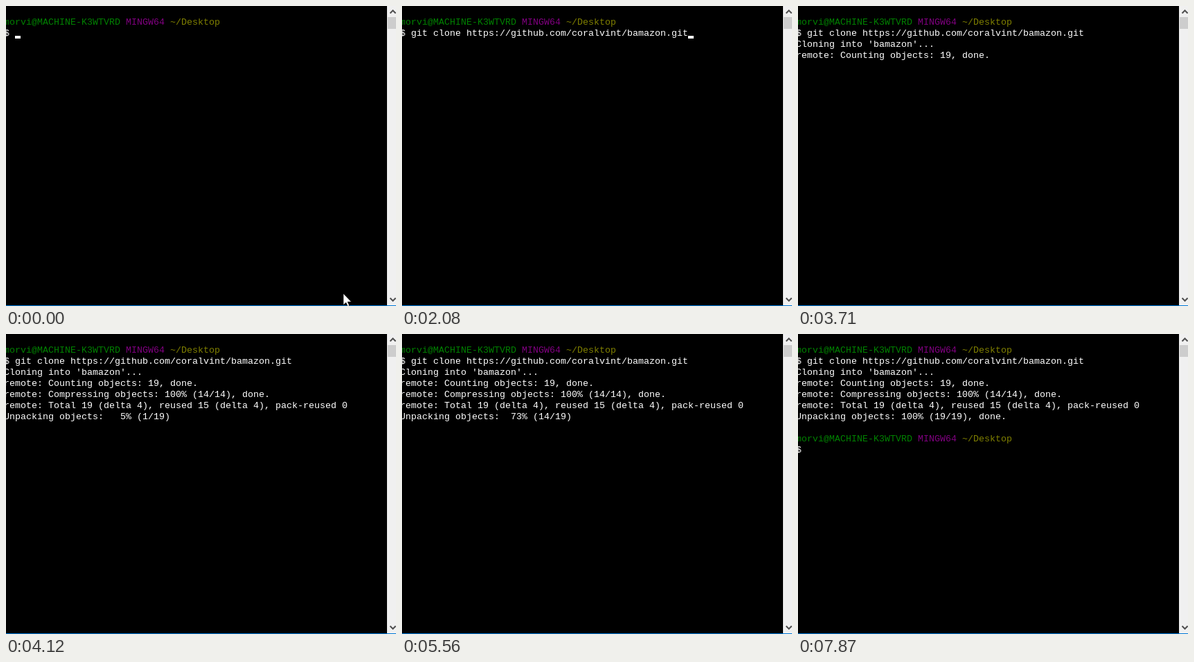
These frames come from a looping animation (563 by 433 pixels, 8 s). An HTML page:

```html
<!DOCTYPE html>
<html lang="en">
<head>
<meta charset="utf-8">
<title>Cloning a repository</title>
<style>
  html, body { margin: 0; width: 100%; height: 100%; overflow: hidden; background: #000; }
  svg { display: block; }
  text { font: 13.333px "Courier New", "Liberation Mono", monospace; white-space: pre; fill: #fff; }
  .user { fill: #008000; }
  .system { fill: #800080; }
  .path { fill: #808000; }
  .arrow { fill: none; stroke: #505050; stroke-width: 2; }
</style>
</head>
<body>
<svg width="563" height="433" viewBox="0 0 563 433">
  <rect width="563" height="433"/>
  <g id="screen"></g>
  <rect id="cursor" width="8" height="4" fill="#fff"/>
  <rect x="550" width="13" height="432" fill="#f0f0f0"/>
  <rect x="551" y="16" width="12" height="17" fill="#cdcdcd"/>
  <path class="arrow" d="M554.5 10.5l4-4 4 4M554.5 421.5l4 4 4-4"/>
  <rect y="432" width="563" height="1" fill="#0078d7"/>
  <path id="mouse" d="M0 0V16.5L3.8 13l2.5 5.5 2.4-1L6.2 12H11.5z" fill="#fff" stroke="#000" stroke-width=".6"/>
</svg>
<script>
const LOOP = 8000, LEFT = -3, COL = 8, ROW = 16, BASE = 27;
const OBJECTS = 19, BLINK = 525, BLINK_START = 495;
const screen = document.getElementById('screen');
const cursor = document.getElementById('cursor');
const mouse = document.getElementById('mouse');

const prompt = '<tspan class="user">morvi@MACHINE-K3WTVRD</tspan> ' +
  '<tspan class="system">MINGW64</tspan> <tspan class="path">~/Desktop</tspan>';
const command = '$ git clone https://github.com/coralvint/bamazon.git';
const remote = [
  'remote: Counting objects: 19, done.',
  'remote: Compressing objects: 100% (14/14), done.',
  'remote: Total 19 (delta 4), reused 15 (delta 4), pack-reused 0'
];

// Each write sets one row; the cursor, if any, stands after its text
const writes = [
  { at: 0, row: 0, text: prompt },
  { at: 0, row: 1, text: '$ ', cursor: 'blink' },
  { at: 170, row: 1, text: command, cursor: 'blink' },
  { at: 2710, row: 2, text: "Cloning into 'bamazon'..." },
  { at: 2710, row: 3, text: '', cursor: 'solid' },
  ...remote.map((text, i) => ({ at: 3640 + 75 * i, row: 3 + i, text })),
  ...Array.from({ length: OBJECTS }, (_, i) => ({ at: 4120 + 110 * i, row: 6, text: progress(i + 1) })),
  { at: 6420, row: 8, text: prompt },
  { at: 6500, row: 9, text: '$ ', cursor: 'blink' }
];

function progress(n) {
  const percent = String(Math.floor(n * 100 / OBJECTS)).padStart(3);
  return `Unpacking objects: ${percent}% (${n}/${OBJECTS})${n === OBJECTS ? ', done.' : ''}`;
}

function move(node, x, y) {
  node.setAttribute('transform', `translate(${x} ${y})`);
}

function drawText(done) {
  const rows = [];
  for (const { row, text } of done) rows[row] = text;
  screen.innerHTML = rows.map((text, row) =>
    `<text x="${LEFT}" y="${BASE + row * ROW}">${text}</text>`).join('');
}

function drawCursor({ row, text, cursor: mode }, time) {
  const lit = Math.floor((time - BLINK_START) / BLINK) & 1;
  cursor.style.display = mode === 'solid' || mode === 'blink' && lit ? '' : 'none';
  move(cursor, LEFT + text.length * COL, BASE + row * ROW);
}

let shown = 0;
function draw(time) {
  const done = writes.filter(({ at }) => at <= time);
  if (done.length !== shown) drawText(done);
  shown = done.length;
  drawCursor(done[shown - 1], time);

  // The pointer leaves through the bottom edge
  const leave = Math.min(1, Math.max(0, (time - 500) / 210));
  move(mouse, 487 + 40 * leave, 415 + 18 * leave);
}

const begin = performance.now();
function tick() {
  draw((performance.now() - begin) % LOOP);
  requestAnimationFrame(tick);
}
tick();
</script>
</body>
</html>
```
